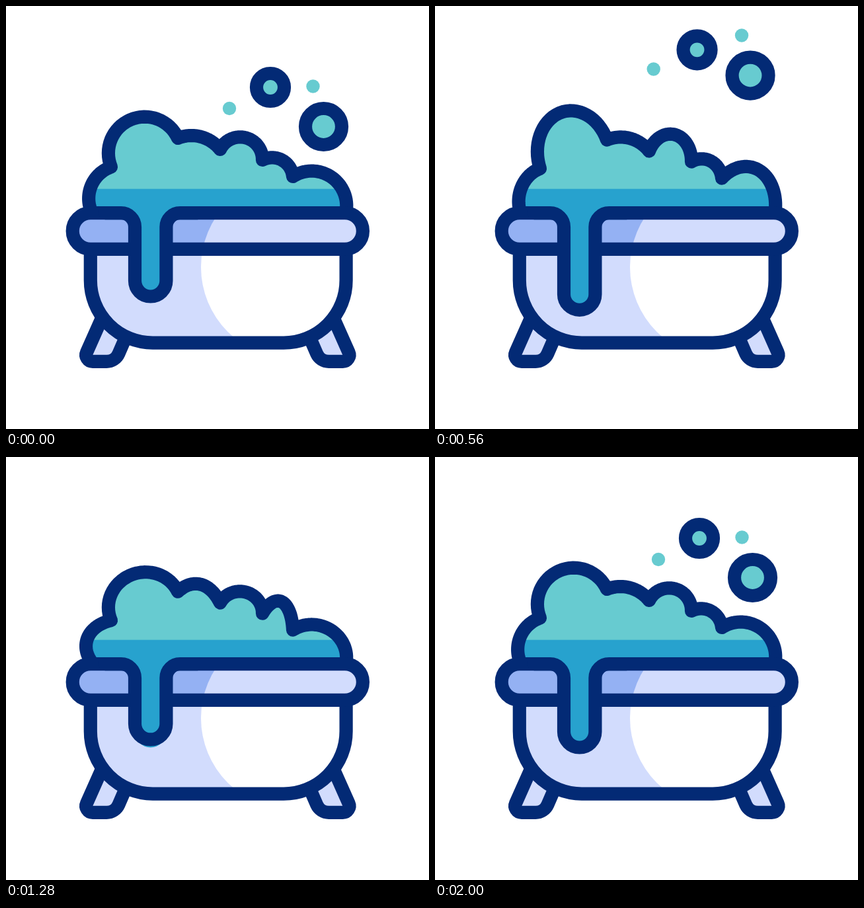
An HTML page with a canvas for the animation above (2.2 s loop, 640 by 640 pixels).

```html
<!DOCTYPE html>
<html lang="en">
<head>
<meta charset="utf-8">
<title>Bubble bath</title>
<style>
html, body { margin: 0; width: 100%; height: 100%; overflow: hidden; background: #fff; }
canvas { display: block; width: 100%; height: 100%; }
</style>
</head>
<body>
<canvas id="stage" width="640" height="640"></canvas>
<script>
const ctx = document.getElementById('stage').getContext('2d');
const NAVY = '#032a75', TEAL = '#67cbd0', BLUE = '#27a2ce';
const PALE = '#d2dcfd', PERI = '#94b1f3', WHITE = '#fff';
const LOOP = 2200, STEP = 40, LAST = 2000, LINE = 20.2;
const AXIS = 320.3, RIM_TOP = 313.2, DRIP = 439.5;

// Each lobe is a circular arc to `end`; its crown swells in the tall and flat pose
const FOAM_START = [128, 308];
const LOBES = [
  { end: [159, 243.5], bulge: 14.8, tall: -2.5, flat: 6 },
  { end: [260, 200], bulge: 54, tall: 13, flat: -3.3 },
  { end: [324, 217], bulge: 11, tall: 0, flat: 9.5 },
  { end: [388, 233], bulge: 26.5, tall: 7.5, flat: -1.5 },
  { end: [434, 258], bulge: 14, tall: 0.5, flat: 19 },
  { end: [515, 308], bulge: 30, tall: 10.5, flat: -2 }
];

// Place at rest, start offset, height risen, sway width and period, growth times
const BUBBLES = [
  { x: 338, y: 155, r: 10.2, from: [9, 114], rise: 183, sway: [7.3, 2150] },
  { x: 464.5, y: 121.5, r: 10.2, from: [-23, 182], rise: 237, sway: [2.2, 1200] },
  { x: 400, y: 123, r: 21, ring: true, from: [4.4, 157], rise: 174.5, sway: [4.7, 1520], grow: [1250, 1640] },
  { x: 480.5, y: 182.5, r: 27.5, ring: true, from: [1.5, 128], rise: 238.5, sway: [4.7, 1520], grow: [1300, 1800] }
];

const clamp = v => Math.max(0, Math.min(1, v));
const span = (t, a, b) => clamp((t - a) / (b - a));
const smooth = u => (1 - Math.cos(Math.PI * u)) / 2;

// Cubic ease-in (1/3, 0, 5/6, 5/6)
function easeIn(x) {
  let lo = 0, hi = 1, y = 0;
  for (let i = 0; i < 24; i++) {
    const s = (lo + hi) / 2;
    y = 2.5 * (1 - s) * s * s + s * s * s;
    if ((1 - s) * (1 - s) * s + y < x) lo = s; else hi = s;
  }
  return y;
}

// Weights of the two extreme poses: rest, tall, flat, rest
function poseAt(t) {
  const up = smooth(span(t, 0, 500));
  const down = smooth(span(t, 500, 1167));
  const back = smooth(span(t, 1167, 1810));
  return { tall: up - down, flat: down - back };
}

function fill(path, color) {
  ctx.fillStyle = color;
  ctx.fill(path);
}

function stroke(path) {
  ctx.strokeStyle = NAVY;
  ctx.lineWidth = LINE;
  ctx.stroke(path);
}

function clipped(path, draw) {
  ctx.save();
  ctx.clip(path);
  draw();
  ctx.restore();
}

function disc(x, y, r) {
  const p = new Path2D();
  p.arc(x, y, r, 0, Math.PI * 2);
  return p;
}

const shine = disc(433.6, 395, 138.6);

const rim = new Path2D();
rim.roundRect(100.7, RIM_TOP, 439.2, 54.6, 27.3);

const tub = new Path2D('M127.8 368V415A94.5 94.5 0 0 0 222 509.6H420A94.5 94.5 0 0 0 514.6 415V368Z');

const leg = new Path2D();
leg.moveTo(146, 470);
leg.arcTo(115.8, 537.9, 150, 537.9, 10);
leg.arcTo(165.2, 537.9, 178.4, 508, 20);
leg.lineTo(182.6, 498);

function addLobe(path, [ax, ay], [bx, by], bulge, swell) {
  const dx = bx - ax, dy = by - ay, half = Math.hypot(dx, dy) / 2;
  const ux = dx / half / 2, uy = dy / half / 2;
  const sweep = 2 * Math.atan(bulge / half), r = half / Math.sin(sweep);
  const steep = Math.abs(dy) > Math.abs(dx);
  for (let i = 0; i <= 32; i++) {
    const a = sweep * (i / 16 - 1);
    const along = half + r * Math.sin(a), out = r * Math.cos(a) - r + bulge;
    const push = swell * out / bulge;
    path.lineTo(
      ax + ux * along + uy * out - (steep ? push : 0),
      ay + uy * along - ux * out - (steep ? 0 : push));
  }
}

function foamPath({ tall, flat }) {
  const path = new Path2D(), sink = 2.5 * tall + 4 * flat;
  let from = FOAM_START;
  LOBES.forEach((lobe, i) => {
    const [x, y] = lobe.end;
    const to = [x, i < LOBES.length - 1 ? y + sink : y];
    addLobe(path, from, to, lobe.bulge, lobe.tall * tall + lobe.flat * flat);
    from = to;
  });
  return path;
}

function dripPath(bottom, edge) {
  const l = 195, r = 242.4, rad = (r - l) / 2, path = new Path2D();
  path.moveTo(edge ? 150 : 174, edge ? RIM_TOP : 302);
  path.lineTo(174, RIM_TOP);
  path.arcTo(l, RIM_TOP, l, 334, 21);
  path.lineTo(l, bottom - rad);
  path.arc(l + rad, bottom - rad, rad, Math.PI, 0, true);
  path.lineTo(r, 334);
  path.arcTo(r, RIM_TOP, 264, RIM_TOP, 21);
  path.lineTo(264, RIM_TOP);
  path.lineTo(edge ? 290 : 264, edge ? RIM_TOP : 302);
  return path;
}

function drawBubble(b, t) {
  let { x, y } = b, size = 1;
  if (t < 1225) {
    const [width, period] = b.sway;
    x -= width * Math.sin(2 * Math.PI * t / period);
    y -= b.rise * easeIn(clamp(t / 1200));
  } else {
    const f = easeIn(clamp((LAST - t) / 750));
    x += f * b.from[0];
    y += f * b.from[1];
    if (b.grow) size = 1 - (1 - span(t, ...b.grow)) ** 2;
  }
  const p = disc(x, y, b.r * size);
  fill(p, TEAL);
  if (b.ring && size > 0) stroke(p);
}

function drawLegs() {
  for (const flip of [false, true]) {
    ctx.save();
    if (flip) {
      ctx.translate(2 * AXIS, 0);
      ctx.scale(-1, 1);
    }
    fill(leg, PALE);
    stroke(leg);
    ctx.restore();
  }
}

function drawShaded(path, base, light) {
  fill(path, base);
  clipped(path, () => fill(shine, light));
  stroke(path);
}

function draw(t) {
  const pose = poseAt(t), foam = foamPath(pose);
  const bottom = DRIP + 21 * pose.tall - 13 * pose.flat;
  ctx.fillStyle = WHITE;
  ctx.fillRect(0, 0, 640, 640);
  ctx.lineJoin = ctx.lineCap = 'round';

  BUBBLES.forEach(b => drawBubble(b, t));

  fill(foam, TEAL);
  clipped(foam, () => {
    ctx.fillStyle = BLUE;
    ctx.fillRect(90, 276.7, 460, 50);
  });
  stroke(foam);

  drawLegs();
  drawShaded(tub, PALE, WHITE);
  drawShaded(rim, PERI, PALE);

  // The liquid stretches down but never shrinks above its rest length
  fill(dripPath(Math.max(bottom, DRIP), false), BLUE);
  stroke(dripPath(bottom, true));
}

function tick() {
  const t = performance.now() % LOOP;
  draw(Math.min(LAST, Math.floor(t / STEP) * STEP));
  requestAnimationFrame(tick);
}
tick();
</script>
</body>
</html>
```
